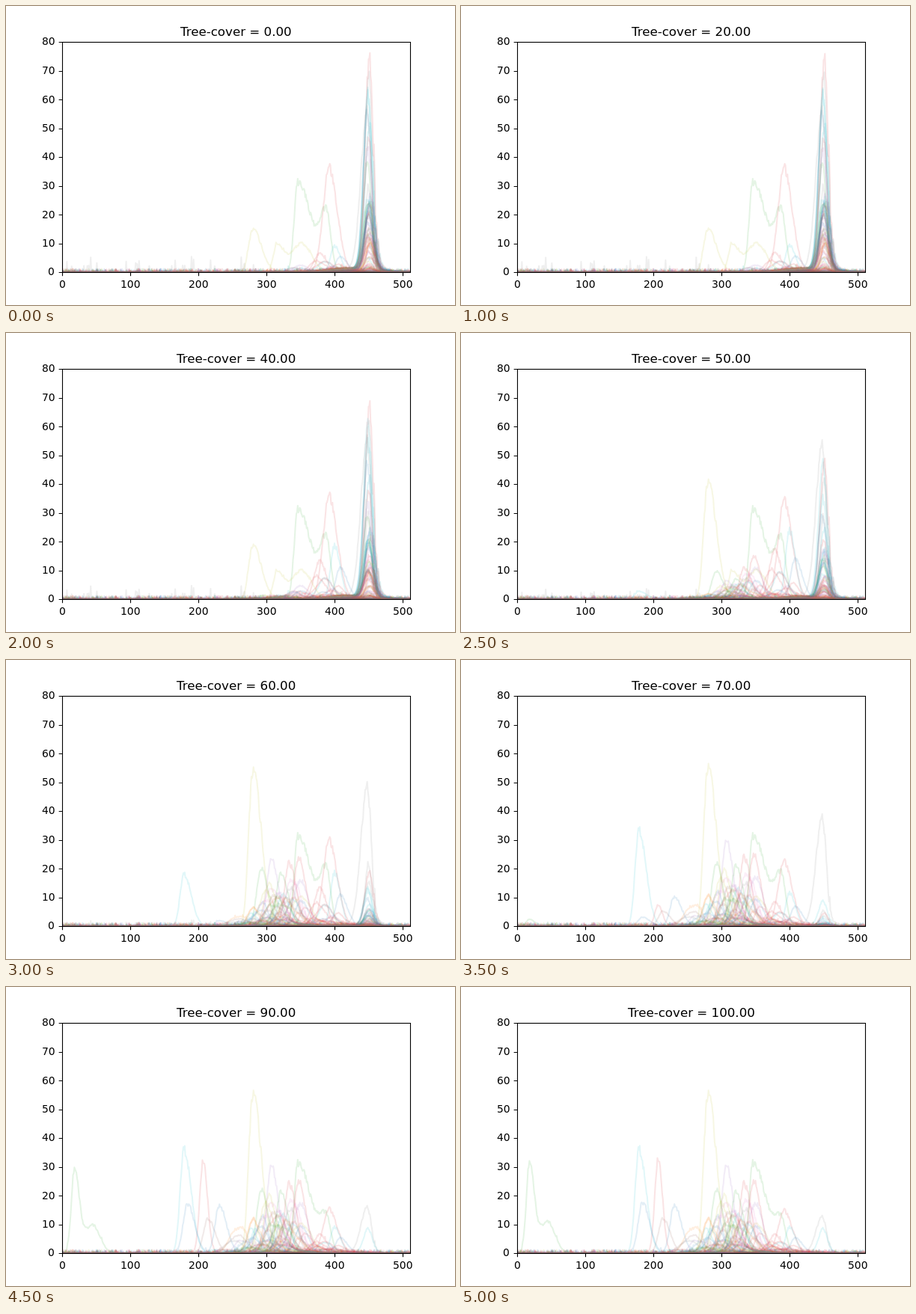
Write an HTML page with a canvas that moves like this. It is 600 px wide and 400 px high and loops after 5.25 s.

```html
<!DOCTYPE html>
<html lang="en">
<head>
<meta charset="utf-8">
<title>Tree-cover</title>
<style>
  html, body { margin: 0; width: 100%; height: 100%; overflow: hidden; background: #fff; }
  canvas { display: block; }
</style>
</head>
<body>
<canvas id="plot" width="600" height="400"></canvas>
<script>
const ctx = document.getElementById('plot').getContext('2d');
const TAB10 = ['#1f77b4', '#ff7f0e', '#2ca02c', '#d62728', '#9467bd',
               '#8c564b', '#e377c2', '#7f7f7f', '#bcbd22', '#17becf'];
const [BLUE, ORANGE, GREEN, RED, PURPLE, BROWN, PINK, GRAY, OLIVE, CYAN] = TAB10.keys();
const BINS = 512;
const px = x => 75 + x * 465 / 511;
const py = y => 356 - y * 3.85;

let seed = 20;
function rand() {
  seed = (seed + 0x6D2B79F5) | 0;
  let t = Math.imul(seed ^ seed >>> 15, 1 | seed);
  t ^= t + Math.imul(t ^ t >>> 7, 61 | t);
  return ((t ^ t >>> 14) >>> 0) / 4294967296;
}
const normal = () => rand() + rand() + rand() + rand() - 2;
const sigmoid = v => 1 / (1 + Math.exp(-v));

// Shapes over the bins
const bump = (c, left = 9, right = 15) => x => Math.exp(-(((x - c) / (x < c ? left : right)) ** 2));
function skirted(c, left, right) {
  const core = bump(c, left, right);
  return x => 0.9 * core(x) + 0.1 * Math.exp(-Math.abs(x - c) / 14);
}

// Heights over the tree cover
const steady = h => () => h;
const rise = (h, mid, span = 4, base = 0) => tc => h * (base + (1 - base) * sigmoid((tc - mid) / span));
const fall = (h, mid, span = 6, base = 0) => rise(h, mid, -span, base);
const pass = h => tc => h * (0.38 + 0.62 * Math.exp(-(((tc - 50) / 15) ** 2)));
// Peaks further left emerge at a higher cover
const onset = c => 42 + (385 - c) * 0.17;

const traces = [];
// Each part is a pair: shape, height
function add(color, ...parts) {
  const gain = [], floor = [];
  for (let x = 0; x < BINS; x++) {
    gain.push(1 + (rand() - 0.5) * (x > 456 ? 0.5 : 0.1));
    floor.push(rand() ** 60 * 1.2);
  }
  traces.push({ color: TAB10[color], parts, gain, floor });
}
const emerge = (color, c, h, mid = onset(c)) => add(color, [bump(c), rise(h, mid)]);

// Tall traces at 450, each lower than the one before
const tall = [RED, GRAY, CYAN, BLUE, CYAN, RED, PURPLE, GREEN];
tall.forEach((color, i) =>
  add(color, [skirted(451 - i % 4, 8.5, 8.5), fall(75 * 0.91 ** i, 53.5 - i, 6)]));
add(GRAY, [skirted(448, 13, 8.5), fall(57, 73, 8, 0.2)]);
add(CYAN, [skirted(449, 9, 9), fall(61, 53, 3, 0.14)]);
add(GRAY, [skirted(450, 7, 7), fall(30, 64, 4)]);

// Traces that stand out
add(OLIVE, [bump(280, 8.5, 18), rise(55, 48, 3.5, 0.27)]);
add(GREEN, [bump(346, 7.5, 28), steady(31)], [bump(388, 12, 9), fall(19, 75, 8, 0.5)]);
add(RED, [bump(392, 12.5, 17), fall(36, 66, 7, 0.4)]);
add(OLIVE, [bump(315, 7, 14), steady(9)], [bump(352, 22, 20), steady(10)]);
add(GREEN, [bump(18, 6.5, 10), rise(30, 80)], [bump(45, 18), rise(11, 82)]);
add(RED, [bump(207, 7, 9), rise(33, 75)]);
add(CYAN, [bump(179, 8), rise(36, 60)]);
add(RED, [bump(378, 11, 14), pass(17)]);
add(CYAN, [bump(400, 8, 12), pass(24)]);
add(BLUE, [bump(408), pass(14)]);
emerge(BLUE, 184, 17.5);
emerge(BROWN, 214, 12);
emerge(BLUE, 231, 16.5);
emerge(GREEN, 292, 22, 51);
emerge(OLIVE, 303, 20);
emerge(PURPLE, 307, 30);
emerge(GREEN, 321, 21);
emerge(RED, 333, 24);
emerge(RED, 347, 25);

// Thin spikes at the low end, fading with cover
const spikes = [];
for (let i = 0; i < 26; i++) spikes[Math.floor(rand() * 290)] = 2 + 3.5 * rand() ** 2;
add(GRAY, [x => spikes[x] || 0, fall(1, 55, 8)]);

// The bulk: a shared peak at 450 that gives way to an own peak further left
for (let i = 0; i < 78; i++) {
  const c = 320 + normal() * 80;
  const own = (1.5 + 17 * rand() ** 2) * Math.exp(-(((c - 320) / 75) ** 2));
  const low = 0.1 + 1.4 * rand() ** 2.5;
  const phase = rand() * 6.28;
  const peak = bump(c, 9 + 9 * rand(), 11 + 12 * rand());
  add(c > 345 && rand() < 0.5 ? RED : i % 10,
    [skirted(449 + 4 * rand(), 7 + 5 * rand(), 8 + 4 * rand()), fall(27 * rand() ** 3, 38 + 18 * rand(), 5)],
    [x => peak(x) * (1 + 0.14 * Math.sin(x / 5 + phase)),
     c > 375 ? pass(own) : rise(own, onset(c), 5, c > 340 ? 0.14 : 0.02)],
    [bump(415, 36, 28), fall(low, 55)],
    [bump(c + 15, 38, 38), rise(low, 52, 6)]);
}

function drawTrace({ color, parts, gain, floor }, tc) {
  const heights = parts.map(([, height]) => height(tc));
  ctx.strokeStyle = color;
  ctx.beginPath();
  for (let x = 0; x < BINS; x++) {
    const sum = parts.reduce((s, [shape], i) => s + shape(x) * heights[i], 0);
    ctx.lineTo(px(x), py(sum * gain[x] + floor[x]));
  }
  ctx.stroke();
}

// Text starts on a whole pixel; align is the share of its width left of x
function label(text, x, y, align) {
  ctx.fillText(text, Math.round(x - ctx.measureText(text).width * align), y);
}
const roundHalfEven = v => v % 1 === 0.5 ? 2 * Math.round(v / 2) : Math.round(v);

function drawAxes(tc) {
  ctx.strokeStyle = ctx.fillStyle = '#000';
  ctx.lineWidth = 1.11;
  ctx.strokeRect(75.5, 48.5, 465, 308);
  ctx.font = '13.89px "DejaVu Sans", sans-serif';
  ctx.beginPath();
  for (let v = 0; v <= 500; v += 100) {
    const x = Math.round(px(v)) + 0.5;
    ctx.moveTo(x, 356.5);
    ctx.lineTo(x, 361.36);
    label(v, px(v), 377, 0.5);
  }
  for (let v = 0; v <= 80; v += 10) {
    const y = Math.round(py(v)) + 0.5;
    ctx.moveTo(75.5, y);
    ctx.lineTo(70.64, y);
    label(v, 65.28, roundHalfEven(py(v) + 4.5), 1);
  }
  ctx.stroke();
  ctx.font = '16.67px "DejaVu Sans", sans-serif';
  label('Tree-cover = ' + tc.toFixed(2), 307.5, 40, 0.5);
}

function draw(tc) {
  ctx.fillStyle = '#fff';
  ctx.fillRect(0, 0, 600, 400);
  ctx.save();
  ctx.beginPath();
  ctx.rect(75, 48, 465, 308);
  ctx.clip();
  ctx.globalAlpha = 0.12;
  ctx.lineWidth = 2.08;
  ctx.lineJoin = 'round';
  traces.forEach(t => drawTrace(t, tc));
  ctx.restore();
  drawAxes(tc);
}

let shown = -1;
function tick() {
  const tc = Math.floor(performance.now() % 5250 / 250) * 5;
  if (tc !== shown) draw(shown = tc);
  requestAnimationFrame(tick);
}
tick();
</script>
</body>
</html>
```
